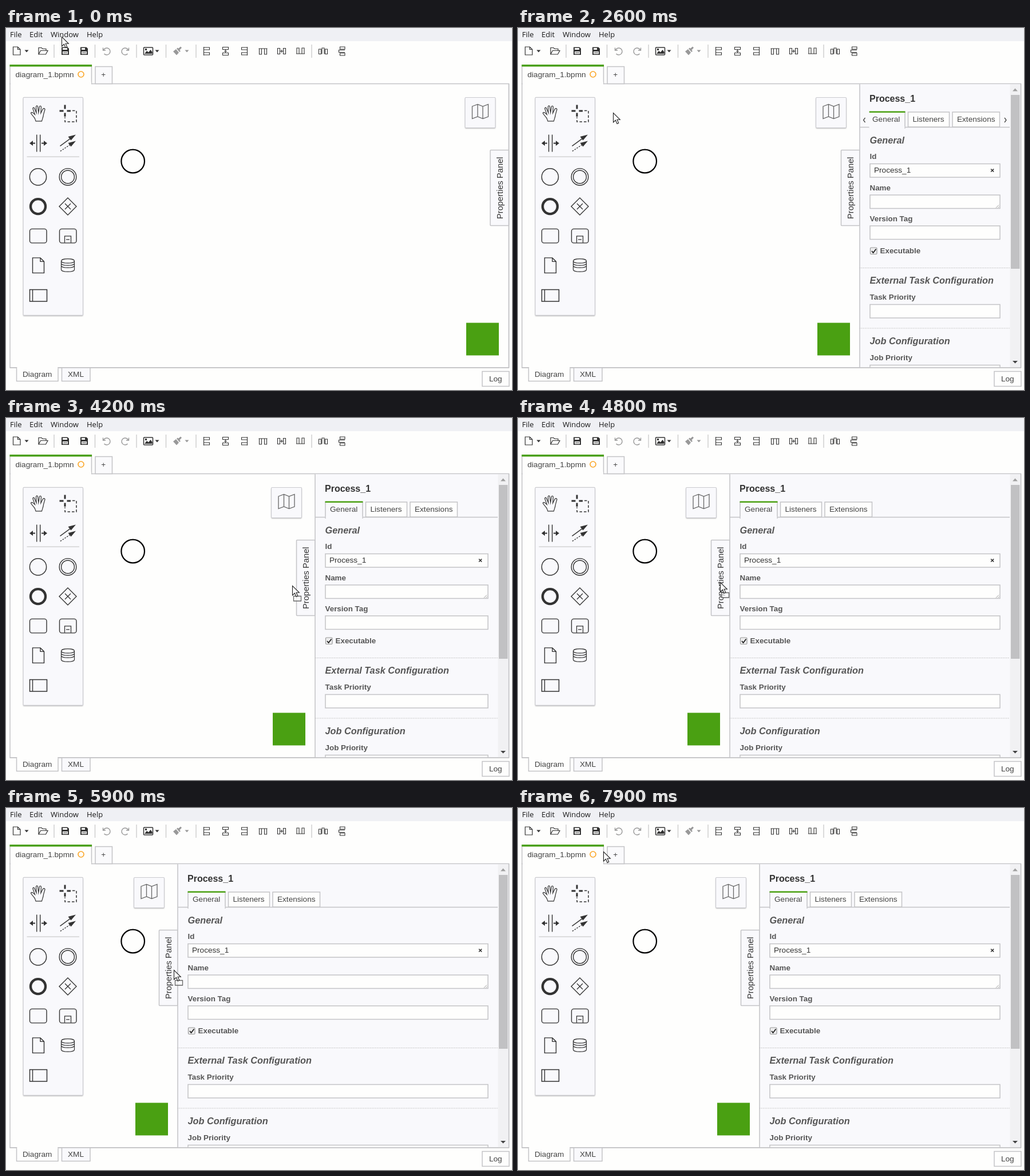
An HTML page with a canvas for the animation above (8000 ms loop, 884 by 633 pixels).

```html
<!DOCTYPE html>
<html>
<head>
<meta charset="utf-8">
<title>Diagram editor</title>
<style>
html, body { margin: 0; width: 100%; height: 100%; overflow: hidden; background: #fefefd; }
canvas { display: block; }
</style>
</head>
<body>
<canvas id="stage" width="884" height="633"></canvas>
<script>
const ctx = document.getElementById('stage').getContext('2d');
const LOOP = 8000, STEP = 100;
const INK = '#333', GREY = '#999', LINE = '#c3c3c6', GREEN = '#4aa012', PANEL = '#f9f9fc', PAGE = '#fefefd';
const SANS = '"Liberation Sans", Arial, sans-serif';

// Pointer path: time, x, y
const POINTER = [
  [0, 97, 15], [400, 97, 15], [700, 100, 18], [900, 100, 18], [1700, 142, 128], [2100, 142, 128],
  [2600, 166, 148], [3000, 489, 271], [3200, 550, 285], [3500, 586, 294], [3900, 586, 294],
  [4000, 561, 294], [4100, 529, 293], [4200, 500, 293], [4700, 359, 288], [4800, 353, 287],
  [5800, 289, 283], [5900, 293, 283], [6400, 402, 298], [6500, 411, 300], [7300, 411, 300],
  [7400, 392, 284], [7800, 160, 86], [7900, 149, 76], [8000, 149, 76]
];

function pointerAt(t) {
  const i = Math.max(1, POINTER.findIndex(p => p[0] >= t));
  const [t0, x0, y0] = POINTER[i - 1], [t1, x1, y1] = POINTER[i];
  const k = (t - t0) / (t1 - t0);
  return [Math.round(x0 + (x1 - x0) * k), Math.round(y0 + (y1 - y0) * k)];
}

// The dragged edge trails the pointer by one step
function panelEdge(t) {
  if (t < 2200) return 878.5;
  if (t < 4000) return 597;
  return pointerAt(Math.min(t, 6600) - STEP)[0] + 11;
}

function box(x, y, w, h, fill, stroke, r = 0, lw = 1.5) {
  ctx.beginPath();
  ctx.roundRect(x, y, w, h, r);
  if (fill) { ctx.fillStyle = fill; ctx.fill(); }
  if (stroke) { ctx.strokeStyle = stroke; ctx.lineWidth = lw; ctx.stroke(); }
}

function circle(x, y, r, lw, color = INK) {
  ctx.beginPath();
  ctx.arc(x, y, r, 0, 7);
  ctx.strokeStyle = color;
  ctx.lineWidth = lw;
  ctx.stroke();
}

function shape(d, { x = 0, y = 0, turn = 0, flip = 1, fill, stroke, lw = 1.4, dash = [] }) {
  const path = new Path2D(d);
  ctx.save();
  ctx.translate(x, y);
  ctx.rotate(turn * Math.PI / 2);
  ctx.scale(flip, 1);
  ctx.setLineDash(dash);
  if (fill) { ctx.fillStyle = fill; ctx.fill(path); }
  if (stroke) { ctx.strokeStyle = stroke; ctx.lineWidth = lw; ctx.stroke(path); }
  ctx.restore();
}

const line = (d, stroke = INK, lw = 1.4, dash) => shape(d, { stroke, lw, dash });
const solid = (d, fill = INK) => shape(d, { fill });

function text(s, x, y, size = 13.6, style = '', color = '#444', family = SANS) {
  ctx.font = `${style} ${size}px ${family}`;
  ctx.fillStyle = color;
  ctx.fillText(s, x, y);
}

function shadowBox(x, y, w, h) {
  ctx.save();
  ctx.shadowColor = 'rgba(0,0,0,.25)';
  ctx.shadowBlur = 2;
  ctx.shadowOffsetY = 1.5;
  box(x, y, w, h, PANEL, null, 1.5);
  ctx.restore();
  box(x, y, w, h, null, '#cacacf', 1.5, 1.2);
}

function drawMenu() {
  box(0, 0, 884, 23, '#eff0f4');
  [['File', 7], ['Edit', 41], ['Window', 78], ['Help', 141]].forEach(([s, x]) =>
    text(s, x, 16, 13, '', '#1a1a1a', '"Open Sans", sans-serif'));
}

function drawToolbar() {
  [84, 155.5, 228, 279.5, 332, 534].forEach(x => line(`M${x} 29v23`, '#ccc'));
  line('M12.5 33h8l4.5 4.5v9.5h-12.5zM20.5 33v4.5h4.5', INK, 1.2);
  line('M57 46V34.5h5l2 2h6v3M57 46l3.5-6.5h12.5l-3.500 6.500z', INK, 1.2);
  for (const x of [97, 130]) {
    solid(`M${x} 33.5h10.5l2.5 2.5v11h-13z`);
    box(x + 2, 35, 8, 3, PAGE);
    box(x + 2, 41, 9, 4.5, PAGE);
    line(`M${x + 3} 43.2h7`, INK, 1);
  }
  line('M139 34v4', INK, 2);
  for (const [x, flip] of [[176, 1], [208, -1]])
    shape('M-5.5-2A6 6 0 1 1-4.5 4.500M-6.500-6v4.500h4.500', { x, y: 40.5, flip, stroke: GREY, lw: 1.4 });
  box(240.5, 34, 16, 13, null, INK, 1);
  solid('M242 45l4-5 3 2.5 3.5-4.5 3 4v3zM243 36h3v3h-3z');
  solid('M292 41l5-4 5 6-4 4.5zM298 36l2-1.5 5 6-2 1.5zM301 36l4-3.5 2 2-3.5 4z', GREY);
  [[36, INK], [264, INK], [316, GREY]].forEach(([x, c]) => solid(`M${x - 3.5} 38.5h7l-3.5 4z`, c));

  const edge = 'M-4.5-7.5v15M-4.5-6.5h10v4h-10M-4.5 2.5h10v4h-10';
  const middle = 'M-5-7h10v4h-10zM-5 3h10v4h-10zM0-3v6M-2.5 0h5';
  const spread = 'M-3.5-3.5h-4v8.5h4zM3.5-3.5h4v8.5h-4zM-2 5v-10.5h4v10.5';
  [[350, edge, 0], [383.5, middle, 0], [417, edge, 2], [449, edge, 1], [481.5, middle, 1],
   [514.5, edge, -1], [554, spread, 0], [587, spread, -1]].forEach(([x, d, turn]) =>
    shape(d, { x, y: 40.5, turn, stroke: INK, lw: 1.1 }));
}

function drawFrame() {
  box(7, 97.5, 871.5, 496.5, PAGE, LINE);
  box(7, 65, 142.5, 32.5, PAGE, LINE);
  box(8, 94, 141, 5, PAGE);
  box(6.5, 64, 143.5, 3.6, GREEN);
  text('diagram_1.bpmn', 16.5, 86);
  circle(131, 81, 5, 1.6, '#fba524');
  box(156, 67.5, 29.5, 30, '#fafafc', LINE);
  text('+', 166.3, 86);
}

function drawFooter() {
  box(18.5, 594, 72.5, 23.5, PAGE, LINE);
  box(19.3, 592.5, 71, 4, PAGE);
  box(97.5, 594, 49.5, 23.5, PANEL, LINE);
  box(832, 600.5, 47, 26, PAGE, LINE);
  text('Diagram', 29, 610);
  text('XML', 108, 610);
  text('Log', 844, 618);
}

function drawPalette() {
  ctx.save();
  ctx.translate(0, -.6);
  shadowBox(30, 122, 104.5, 381);
  line('M52 163.5L50.5 159C48 154.5 44 151.5 43.5 149.5Q44 147.5 46.5 148.5L50.5 152 46.8 141.5Q47.5 138.5 49.5 140.5L53 149 52.5 138Q54 135 55.5 138L56.8 148.5 58.5 138Q60.5 135.5 61.5 138.5L60.8 149.5 64.5 142Q67.5 140 68 143L65.5 152C65 157 63.5 159 62.5 163.5Z', INK, 1.2);
  line('M103 135v7M103 149v6.5M93.5 145.5h7M106.5 145.5h6.5', INK, 3);
  line('M116 145h7v19.5h-20v-8', INK, 1.5, [4.5, 3]);
  line('M53.7 187v30M59.7 187v30');
  line('M43 202h8M62 202h8', INK, 2);
  solid('M41 202l6-4.5v9zM72 202l-6-4.5v9z');
  line('M94.5 207L113 193.5');
  line('M95 216L113 204', INK, 1.4, [2.5, 2]);
  solid('M122 187l-8.5 10-5-6.5zM122 198l-8.5 10-5-6.5z');
  line('M36.5 225.7h91.5', '#ccc', 1.3);
  circle(56, 261, 14.6, 1.5);
  circle(108, 261, 14.8, 1.4);
  circle(108, 261, 11.4, 1.4);
  circle(56, 312.7, 13, 4.4);
  line('M108 297.5l15 15-15 15-15-15zM103 307.500l10 10M113 307.500l-10 10');
  box(41.5, 352, 29.5, 24.5, null, INK, 4, 1.4);
  box(93.5, 352, 29.5, 24.5, null, INK, 4, 1.4);
  line('M102.5 376v-11.5h11v11.5M105 370.5h6', INK, 1.3);
  line('M46.5 402.5h13.5l6.5 6.5v20h-20zM60 402.5v6.5h6.5');
  line('M96.5 408C96.5 403 119.5 403 119.5 408V423C119.5 428 96.5 428 96.5 423ZM96.5 408C96.5 413 119.5 413 119.5 408M96.5 412C96.5 417 119.5 417 119.5 412M96.5 416C96.5 421 119.5 421 119.5 416', INK, 1.2);
  box(41.5, 458, 30, 20.5, null, INK);
  line('M46.5 458v20.5');
  ctx.restore();
}

function drawOverlays(edge) {
  box(Math.round(edge - 74.5), 515.5, 57, 57, GREEN);
  shadowBox(edge - 76.5, 121.5, 53, 53);
  shape('M-14-9l9.5-3.5 9 3.5 9.5-3.5v21.5l-9.5 3.5-9-3.5-9.5 3.5zM-4.5-12.5v21.5M4.5-9v21.5',
    { x: edge - 50, y: 146, stroke: '#666', lw: 1.3 });
  box(edge - 32.5, 213.5, 32.5, 132, PANEL, LINE, 1);
  ctx.save();
  ctx.translate(edge - 11, 334);
  ctx.rotate(-Math.PI / 2);
  text('Properties Panel', 0, 0, 14.7, '', INK);
  ctx.restore();
}

function drawTabs(edge) {
  const scrolled = edge > 594;
  const x = edge - (scrolled ? 4 : 0);
  line(`M${edge} 173.5H859`, LINE);
  ctx.save();
  ctx.beginPath();
  ctx.rect(edge + 16.7, 140, 826 - edge, 40);
  ctx.clip();
  [['Listeners', 88.5, 72], ['Extensions', 166, 82.5]].forEach(([s, dx, w]) => {
    box(x + dx, 147, w, 26, PAGE, LINE);
    text(s, x + dx + 8, 164);
  });
  box(x + 18, 147, 65, 28, PANEL, LINE);
  box(x + 18.8, 172, 63.5, 4, PANEL);
  box(x + 17.5, 145.5, 66, 2.5, GREEN);
  text('General', x + 26, 164);
  ctx.restore();
  if (scrolled) line(`M${edge + 9.5} 157l-3 4 3 4M850 157l3 4-3 4`, '#444', 1.3);
}

function drawPanel(edge) {
  const x = edge + 18;
  ctx.save();
  ctx.beginPath();
  ctx.rect(edge - 1, 98.2, 880 - edge, 495.2);
  ctx.clip();
  box(edge, 97, 878 - edge, 500, PANEL, LINE);
  text('Process_1', x - 1, 129, 16, 'bold', INK);
  drawTabs(edge);
  [['General', 202], ['External Task Configuration', 447], ['Job Configuration', 553]].forEach(([s, y]) =>
    text(s, x - .5, y, 16.3, 'italic bold', '#555'));
  [['Id', 229], ['Name', 284], ['Version Tag', 338], ['Task Priority', 475], ['Job Priority', 581]]
    .forEach(([s, y]) => text(s, x - .5, y, 13.4, 'bold', '#555'));
  [237.5, 292, 346, 483.5, 589.5].forEach(y => box(x, y, 842 - x, 23.5, PAGE, LINE));
  text('Process_1', x + 7, 253, 13.6, '', INK);
  line('M826.2 246.500l5 5M831.200 246.500l-5 5', INK, 1.7);
  line('M835 314.5l5-5M838.5 314.5l2-2', GREY, 1);
  box(x + .5, 384, 11.5, 11.5, '#ededee', '#999', 1.5, 1.2);
  shape('M3 6l2.5 3 5-6.5', { x, y: 384, stroke: '#222', lw: 1.8 });
  text('Executable', x + 17.5, 394, 13.4, 'bold', '#555');
  line(`M${edge} 419.5H859M${edge} 525H859`, '#bbb', 1.2, [1.5, 1.5]);
  box(859.5, 98, 18.5, 497, '#f1f1f3');
  box(861, 117, 15.5, 304, '#c1c1c3');
  solid('M864 110.5h9l-4.5-5z', '#a0a0a0');
  solid('M864 582h9l-4.5 4.5z', '#444');
  ctx.restore();
}

function drawPointer(t) {
  const [x, y] = pointerAt(t);
  if (t >= 4000 && t < 7000)
    shape('M2.5 18.5h13v8.5h-13z', { x, y, fill: 'rgba(255,255,255,.6)', stroke: '#666', lw: 1.3 });
  shape('M.5 .5v16.5l3.9-3.7 2.7 6.2 2.7-1.2-2.7-6h5.2z',
    { x, y, fill: '#fff', stroke: '#222', lw: 1.1 });
}

function render() {
  const t = Math.floor(performance.now() % LOOP / STEP) * STEP;
  const edge = panelEdge(t);
  box(0, 0, 884, 633, PAGE);
  drawMenu();
  drawToolbar();
  drawFrame();
  circle(221.7, 233, 20.3, 2.2, '#000');
  drawPalette();
  drawOverlays(edge);
  if (edge < 870) drawPanel(edge);
  line('M878.5 97.5V594M7 594H879', LINE, 1.5);
  drawFooter();
  drawPointer(t);
  requestAnimationFrame(render);
}
render();
</script>
</body>
</html>
```
